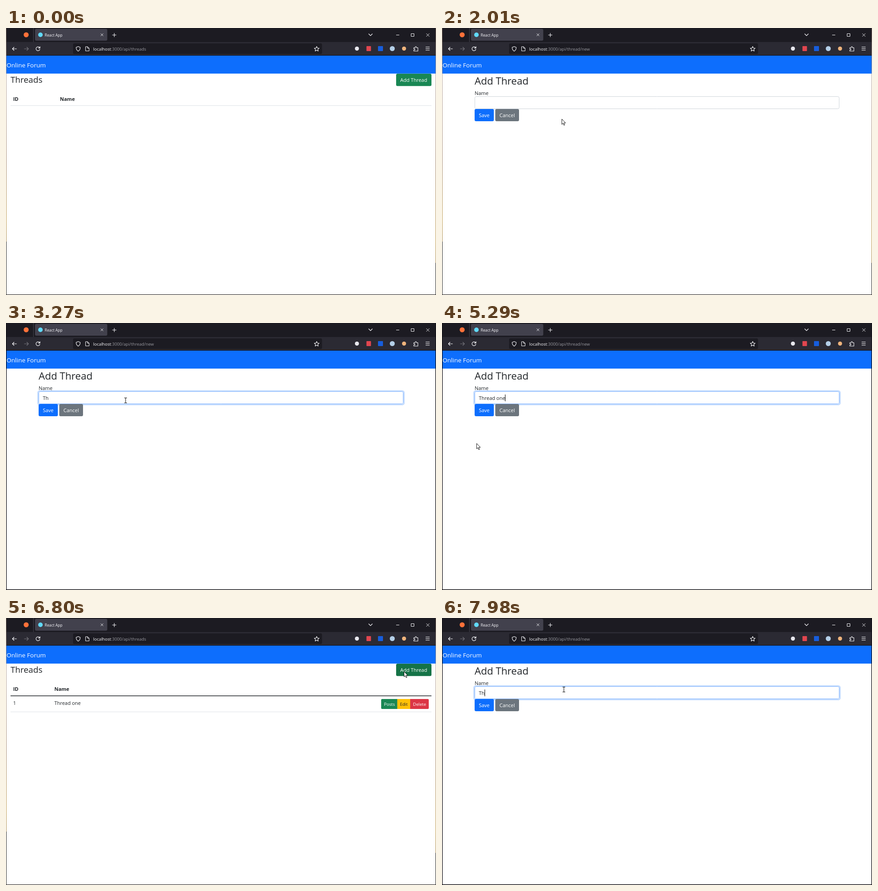
Animation, 949 px wide and 590 px high, one loop 8 s. Source, as an HTML page with a canvas:

```html
<!DOCTYPE html>
<html lang="en">
<head>
<meta charset="utf-8">
<title>Online Forum</title>
<style>
html, body { margin: 0; width: 100%; height: 100%; overflow: hidden; background: #fff; }
canvas { display: block; }
</style>
</head>
<body>
<canvas id="stage" width="949" height="590"></canvas>
<script>
const ctx = document.getElementById('stage').getContext('2d');
const LOOP = 8000, TICK = 90;
const INK = '#212529', LIGHT = '#fbfbfe', GREEN = '#198754', BLUE = '#0d6efd';

// Cursor positions: [time, x, y]
const path = [
  [570, 265, 277], [840, 470, 235], [1110, 740, 172], [1290, 841, 148],
  [1380, 872, 124], [1470, 882, 119], [1650, 876, 118], [1830, 560, 150],
  [2010, 264, 201], [2110, 264, 197], [2190, 264, 186], [2370, 264, 171],
  [5110, 264, 171], [5200, 176, 220], [5290, 76, 266], [5470, 79, 228],
  [5640, 82, 195], [6000, 82, 195], [6180, 290, 182], [6440, 720, 148],
  [6620, 885, 133], [6710, 885, 133], [6800, 878, 118], [6980, 860, 121],
  [7160, 380, 152], [7250, 269, 158], [LOOP, 269, 158]
];

// Input field: [time, value, caret visible]
const typing = [
  [0, '', 0], [2550, '', 1], [2820, '', 0], [3000, 'T', 1], [3090, 'Th', 1],
  [3270, 'Th', 0], [3450, 'Thr', 1], [3540, 'Thre', 1], [3630, 'Threa', 1],
  [3820, 'Threa ', 1], [3910, 'Threa', 1], [4190, 'Threa', 0],
  [4370, 'Thread ', 1], [4550, 'Thread o', 1], [4640, 'Thread on', 1],
  [4920, 'Thread one', 0], [5010, 'Thread one', 1], [5640, 'Thread one', 0],
  [6000, '', 0], [7420, '', 1], [7890, 'T', 1], [7980, 'Th', 1]
];

const between = (t, a, b) => t >= a && t < b;

function box(x, y, w, h, fill, r = 0) {
  ctx.fillStyle = fill;
  ctx.beginPath();
  ctx.roundRect(x, y, w, h, r);
  ctx.fill();
}

function outline(x, y, w, h, color, r, width = 1) {
  ctx.strokeStyle = color;
  ctx.lineWidth = width;
  ctx.beginPath();
  ctx.roundRect(x, y, w, h, r);
  ctx.stroke();
}

function dot(x, y, r, fill) {
  box(x - r, y - r, 2 * r, 2 * r, fill, r);
}

function text(s, x, y, size, color = INK, weight = 400) {
  ctx.font = `${weight} ${size}px "Open Sans", "Noto Sans", sans-serif`;
  ctx.fillStyle = color;
  ctx.fillText(s, x, y);
  return ctx.measureText(s).width;
}

function icon(x, y, d, color = LIGHT, width = 1.1, fill) {
  ctx.save();
  ctx.translate(x, y);
  ctx.lineCap = ctx.lineJoin = 'round';
  const shape = new Path2D(d);
  if (fill) {
    ctx.fillStyle = fill;
    ctx.fill(shape);
  }
  ctx.strokeStyle = color;
  ctx.lineWidth = width;
  ctx.stroke(shape);
  ctx.restore();
}

function button(label, x, y, w, h, fill, pad, size = 11, color = '#fff', r = 3) {
  box(x, y, w, h, fill, r);
  text(label, x + pad, y + h / 2 + size * 0.36 + 0.5, size, color);
}

function drawChrome(url) {
  box(0, 0, 949, 31, '#1c1b22');
  box(0, 31, 949, 30, '#2b2a33');
  box(0, 60, 949, 1, '#0e0d12');
  dot(44.5, 15, 5.5, '#ff7139');
  box(60, 0, 1, 31, '#45444d');
  box(64, 2, 159.5, 26, '#42414d', 3);
  dot(76, 15, 5, '#61dafb');
  text('React App', 85.5, 18.7, 8.35, LIGHT);
  icon(211.8, 15, 'M-2.5-2.5l5 5m0-5l-5 5', LIGHT, 0.9);
  icon(239, 15.5, 'M-4 0h8M0-4v8');
  icon(804.5, 15, 'M-4-2l4 4 4-4');
  icon(864.5, 15.5, 'M-3 0h6', LIGHT, 1);
  icon(897.5, 15.5, 'M-3-3h6v6h-6z', LIGHT, 1);
  icon(931, 15.5, 'M-3.2-3.2l6.4 6.4m0-6.4l-6.4 6.4', LIGHT, 0.9);

  icon(18.7, 46, 'M4.5 0h-9l3.5-3.5M-4.5 0l3.5 3.5', LIGHT, 1.2);
  icon(45, 46, 'M-4.5 0h9l-3.5-3.5M4.5 0l-3.5 3.5', '#74737b', 1.2);
  icon(70.5, 46, 'M4.2 1A4.3 4.3 0 1 1 3-3.2L4.5-1.7M4.5-5v3.3h-3.3', LIGHT, 1.2);

  box(148, 34, 549.5, 23.5, '#1c1b22', 3);
  icon(159.3, 46, 'M0-5l4.5 1.7c0 4-1 6.5-4.5 8.5c-3.5-2-4.5-4.500-4.500-8.500z');
  icon(179.7, 46, 'M-3.700-4.700h4l3.400 3.400v6h-7.400zM.3-4.700v3.400h3.400', LIGHT, 1);
  const w = text('localhost', 192.5, 49.8, 9.4, LIGHT);
  text(url, 192.5 + w, 49.8, 9.4, '#98989f');
  icon(685.7, 46, 'M0-5.300l1.600 3.500 3.800.4-2.800 2.600.8 3.800-3.400-1.900-3.400 1.900.8-3.800-2.800-2.600 3.800-.4z');

  dot(774.5, 45.5, 4.5, '#e8e8ee');
  box(795.500, 40, 10, 11, '#e2464f', 1);
  box(821, 40, 11, 11, '#175ddc', 1);
  dot(852.5, 45.5, 5.5, '#b4cfe8');
  dot(878.5, 45.5, 4.5, '#f0b47c');
  icon(904.500, 46, 'M-4.500-2.500h3v-1a1.500 1.500 0 0 1 3 0v1h3v7.500h-9v-2.500h1.200a1.300 1.300 0 0 0 0-2.600h-1.200z');
  icon(930.5, 45.5, 'M-4-3.500h8M-4 0h8M-4 3.500h8');

  box(1, 61, 947, 39.7, BLUE);
  text('Online Forum', 1.3, 87, 13.5, '#fff');
}

function drawList(filled, hover) {
  const nameX = filled ? 106.7 : 119;
  text('Threads', 10, 121, 18.7);
  button('Add Thread', 861, 101, 78, 27.300, hover ? '#157347' : GREEN, 9);
  text('ID', 15.7, 161.300, 11, INK, 700);
  text('Name', nameX, 161.300, 11, INK, 700);
  if (!filled) {
    box(10, 171, 929, 1, '#dee2e6');
    return;
  }
  box(10, 171.300, 929, 1.5, INK);
  text('1', 15.7, 191.700, 10.95);
  text('Thread one', nameX, 191.700, 10.95);
  button('Posts', 828, 179, 36, 22, GREEN, 6.300, 9.500, '#fff', [2, 0, 0, 2]);
  button('Edit', 863.500, 179, 29, 22, '#ffc107', 6, 9.500, INK, 0);
  button('Delete', 892, 179, 41, 22, '#dc3545', 6.300, 9.500, '#fff', [0, 2, 2, 0]);
  box(10, 207, 929, 1, '#dee2e6');
}

function drawForm(t) {
  const [, value, caret] = typing.findLast(k => k[0] <= t);
  const focus = between(t, 2460, 5640) || t >= 7420;
  text('Add Thread', 72, 124.5, 22);
  text('Name', 72, 147.800, 10.95);
  if (focus) outline(70.6, 150.100, 807.800, 30.300, '#c2dbfe', 4, 2.9);
  box(72, 151.500, 805, 27.500, '#fff', 3);
  outline(72.5, 151.500, 804, 27, focus ? '#86b7fe' : '#ced4da', 3);
  const w = text(value, 81.3, 170, 10.95);
  if (caret) box(Math.floor(81.3 + w), 158, 1, 15, '#000');
  button('Save', 72, 179, 42.5, 27, between(t, 5560, 6000) ? '#0b5ed7' : BLUE, 9.2);
  button('Cancel', 117.5, 179, 52.5, 27, '#6c757d', 9.2);
}

function drawEdges(dark) {
  const strip = (x, split) => {
    const g = ctx.createLinearGradient(0, 0, 0, 590);
    g.addColorStop(0, '#6b5a50');
    g.addColorStop(0.18, '#b8a9a0');
    g.addColorStop(0.5, '#a58b72');
    g.addColorStop(split - 0.08, '#bf9b4c');
    g.addColorStop(split, '#a88a50');
    g.addColorStop(split, '#22201f');
    g.addColorStop(1, '#22201f');
    box(x, 0, 1, 590, g);
  };
  if (dark) {
    box(0, 0, 1.3, 590, '#16151a');
    box(947.7, 0, 1.3, 590, '#16151a');
    box(0, 588.500, 949, 1.5, '#16151a');
  } else {
    strip(0, 0.8);
    strip(948, 0.88);
    box(0, 588.700, 949, 1.3, '#3b3735');
  }
}

function cursorAt(t) {
  const i = path.findLastIndex(k => k[0] <= t);
  const [t0, x0, y0] = path[i], [t1, x1, y1] = path[i + 1];
  const p = Math.floor((t - t0) / TICK) * TICK / (t1 - t0);
  return [x0 + (x1 - x0) * p, y0 + (y1 - y0) * p];
}

function drawCursor(t) {
  if (t < path[0][0]) return;
  const [x, y] = cursorAt(t);
  const hand = between(t, 1560, 1650) || between(t, 5640, 6000) || between(t, 6890, 6980);
  const beam = between(t, 2280, 5200) || t >= 7250;
  if (beam) {
    icon(x, y, 'M-2.500-5.500h5M0-5.500v11M-2.500 5.500h5', '#000', 1);
  } else if (hand) {
    icon(x, y, 'M-1.500 1.200q1.500-2 2.500 0v4.300l4 .8q1.700.5 1.500 2.500l-1 5.700h-5.500l-3.500-5q-.8-1.800.8-1.700l1.200 1.200z', '#000', 0.9, '#fff');
  } else {
    icon(x + 0.5, y + 0.5, 'M0 0v11.500l2.600-2.500 2 4.500 1.800-.8-2-4.300h3.500z', '#000', 0.9, '#fff');
  }
}

function draw(t) {
  const form = between(t, 1650, 6000) || t >= 6980;
  box(0, 0, 949, 590, '#fff');
  drawChrome(form ? ':3000/api/thread/new' : ':3000/api/threads');
  if (form) drawForm(t);
  else drawList(t >= 6000, between(t, 1470, 1650) || t >= 6800);
  drawEdges(between(t, 3000, 5640) || t >= 7890);
  drawCursor(t);
}

const start = performance.now();
function frame() {
  draw((performance.now() - start) % LOOP);
  requestAnimationFrame(frame);
}
frame();
</script>
</body>
</html>
```
